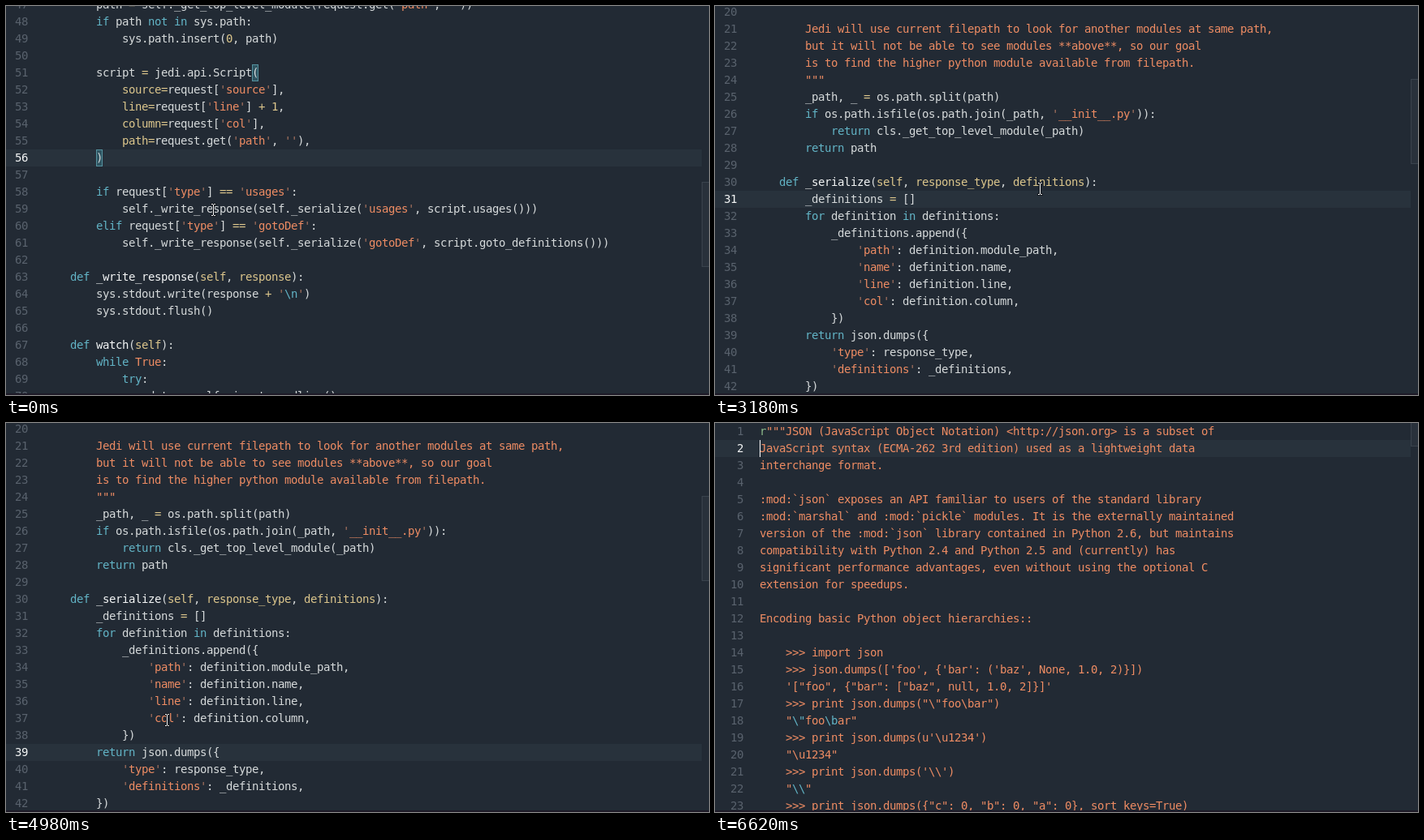
These frames come from a looping animation (866x480 px, 6690 ms). An HTML page with a canvas:

```html
<!DOCTYPE html>
<html lang="en">
<head>
<meta charset="utf-8">
<title>Go to definition</title>
<style>
html, body { margin: 0; width: 100%; height: 100%; overflow: hidden; background: #222a34; }
canvas { display: block; }
</style>
</head>
<body>
<canvas id="stage" width="866" height="480"></canvas>
<script>
const ctx = document.getElementById('stage').getContext('2d');
const LOOP = 6690, ROW = 21, CELL = 8, EDGE = 857;
const C = {
  bg: '#222a34', row: '#28323c', foot: '#1e1a27', text: '#d6dadb', bright: '#f4f6f6',
  key: '#62b4c6', str: '#ee8c63', quote: '#a9745f', tan: '#dcc68c', prefix: '#8dbb8b',
  num: '#59626d', thumb: '#29313b', rim: '#3a434d', match: '#2f5461', matchRim: '#55929f'
};

const split = s => s.slice(1).split('\n');

const request = {
  first: 47, top: -12, left: 47, thumb: [217, 105],
  lines: split(String.raw`
        path = self._get_top_level_module(request.get('path', ''))
        if path not in sys.path:
            sys.path.insert(0, path)

        script = jedi.api.Script(
            source=request['source'],
            line=request['line'] + 1,
            column=request['col'],
            path=request.get('path', ''),
        )

        if request['type'] == 'usages':
            self._write_response(self._serialize('usages', script.usages()))
        elif request['type'] == 'gotoDef':
            self._write_response(self._serialize('gotoDef', script.goto_definitions()))

    def _write_response(self, response):
        sys.stdout.write(response + '\n')
        sys.stdout.flush()

    def watch(self):
        while True:
            try:
                data = self._input.readline()`)
};

const serialize = {
  first: 20, top: -3, left: 47, thumb: [90, 105], docEnd: 24,
  lines: split(String.raw`

        Jedi will use current filepath to look for another modules at same path,
        but it will not be able to see modules **above**, so our goal
        is to find the higher python module available from filepath.
        """
        _path, _ = os.path.split(path)
        if os.path.isfile(os.path.join(_path, '__init__.py')):
            return cls._get_top_level_module(_path)
        return path

    def _serialize(self, response_type, definitions):
        _definitions = []
        for definition in definitions:
            _definitions.append({
                'path': definition.module_path,
                'name': definition.name,
                'line': definition.line,
                'col': definition.column,
            })
        return json.dumps({
            'type': response_type,
            'definitions': _definitions,
        })`)
};

const library = {
  first: 1, top: 0, left: 55, thumb: [-1, 30], docEnd: 99,
  lines: split(String.raw`
r"""JSON (JavaScript Object Notation) <http://json.org> is a subset of
JavaScript syntax (ECMA-262 3rd edition) used as a lightweight data
interchange format.

:mod:${'`json`'} exposes an API familiar to users of the standard library
:mod:${'`marshal`'} and :mod:${'`pickle`'} modules. It is the externally maintained
version of the :mod:${'`json`'} library contained in Python 2.6, but maintains
compatibility with Python 2.4 and Python 2.5 and (currently) has
significant performance advantages, even without using the optional C
extension for speedups.

Encoding basic Python object hierarchies::

    >>> import json
    >>> json.dumps(['foo', {'bar': ('baz', None, 1.0, 2)}])
    '["foo", {"bar": ["baz", null, 1.0, 2]}]'
    >>> print json.dumps("\"foo\bar")
    "\"foo\bar"
    >>> print json.dumps(u'\u1234')
    "\u1234"
    >>> print json.dumps('\\')
    "\\"
    >>> print json.dumps({"c": 0, "b": 0, "a": 0}, sort_keys=True)`)
};

// Each view starts at a time and shows a page with one active line.
const views = [
  { at: 0, page: request, line: 56, brackets: [[303, 72], [111, 177]] },
  { at: 1390, page: request, line: 59 },
  { at: 2700, page: serialize, line: 31 },
  { at: 4310, page: serialize, line: 39 },
  { at: 5100, page: library, line: 2 }
];

// Visible spans of the blinking caret: from, to, x, y.
const carets = [
  [1810, 2210, 415, 240], [2640, 2700, 415, 240],
  [2700, 3180, 111, 228], [3570, 3970, 111, 228], [4250, 4310, 111, 228],
  [4310, 4710, 183, 396],
  [5100, 5510, 55, 21], [5890, 6260, 55, 21], [6620, LOOP, 55, 21]
];

// Mouse path: time, x, y.
const path = [
  [0, 255, 251], [590, 255, 251], [710, 290, 268], [830, 366, 281], [990, 429, 265],
  [1070, 429, 265], [1190, 417, 257], [1569, 417, 257], [1570, 413, 252],
  [3140, 413, 252], [3350, 348, 112], [3530, 348, 112], [3730, 262, 230],
  [3930, 180, 358], [4210, 184, 403], [4540, 184, 403], [4860, 198, 366],
  [5640, 198, 366], [5840, 420, 436], [5960, 650, 443], [6080, 880, 430], [LOOP, 880, 430]
];

const keywords = /^(if|elif|not|in|for|def|while|try|return)$/;
const tokens = /'[^']*'|\w+(?==)|\w+|[=+]+|\s+|[^\w\s]/g;

function colorCode(line) {
  const out = [];
  const add = (s, color) => out.push([s, color]);
  const isDef = /^\s*def /.test(line);
  let inArgs = false, afterDef = false;
  for (const m of line.matchAll(tokens)) {
    const s = m[0], next = line[m.index + s.length];
    if (s[0] === "'") {
      const body = s.slice(1, -1);
      add("'", C.quote);
      add(body, body[0] === '\\' ? C.key : C.str);
      add("'", C.quote);
    } else if (keywords.test(s)) {
      add(s, C.key);
      afterDef = s === 'def';
    } else if (s === 'True') add(s, C.str);
    else if (/^(\d+|[=+]+)$/.test(s)) add(s, C.tan);
    else if (/^\w/.test(s)) {
      const param = next === '=' || isDef && inArgs;
      add(s, param ? C.tan : afterDef ? C.bright : C.text);
      afterDef = false;
    } else {
      if (s === '(') inArgs = true;
      add(s, C.text);
    }
  }
  return out;
}

function colorDoc(line) {
  if (line.startsWith('r"""')) return [['r', C.prefix], [line.slice(1), C.str]];
  if (!/^ +"\\[^u]/.test(line)) return [[line, C.str]];
  return line.split(/(\\.)/).map(s => [s, s[0] === '\\' ? C.key : C.str]);
}

for (const page of [request, serialize, library]) {
  page.runs = page.lines.map((line, i) =>
    page.first + i <= (page.docEnd || 0) ? colorDoc(line) : colorCode(line));
}

function rect(x, y, w, h, color) {
  ctx.fillStyle = color;
  ctx.fillRect(x, y, w, h);
}

function framed(x, y, w, h, fill, rim) {
  rect(x, y, w, h, rim);
  rect(x + 1, y + 1, w - 2, h - 2, fill);
}

// Writes on the character grid and returns the next free x.
function write(s, x, y, color) {
  ctx.fillStyle = color;
  for (const ch of s) {
    if (ch !== ' ') ctx.fillText(ch, x, y);
    x += CELL;
  }
  return x;
}

function drawPage({ page, line, brackets = [] }) {
  rect(0, page.top + (line - page.first) * ROW, EDGE, ROW, C.row);
  for (const [x, y] of brackets) framed(x, y, CELL, ROW, C.match, C.matchRim);
  page.runs.forEach((runs, i) => {
    const n = page.first + i, label = String(n);
    const y = page.top + i * ROW + 15;
    write(label, page.left - 20 - label.length * CELL, y, n === line ? C.bright : C.num);
    let x = page.left;
    for (const [s, color] of runs) x = write(s, x, y, color);
  });
  framed(EDGE, page.thumb[0], 12, page.thumb[1], C.thumb, C.rim);
}

function drawPointer(x, y) {
  const beam = [[-2, -7, 2, 1], [1, -7, 2, 1], [0, -6, 1, 13], [-2, 7, 2, 1], [1, 7, 2, 1]];
  for (const [a, b, w, h] of beam) rect(x + a - 1, y + b - 1, w + 2, h + 2, '#151a20');
  for (const [a, b, w, h] of beam) rect(x + a, y + b, w, h, '#fff');
}

function pointerAt(t) {
  const i = path.findIndex(p => p[0] > t);
  const [t0, x0, y0] = path[i - 1], [t1, x1, y1] = path[i];
  const k = (t - t0) / (t1 - t0);
  return [Math.round(x0 + (x1 - x0) * k), Math.round(y0 + (y1 - y0) * k)];
}

function draw(t) {
  rect(0, 0, 866, 480, C.bg);
  ctx.font = '14px "DejaVu Sans Mono", monospace';
  drawPage(views.findLast(v => v.at <= t));
  for (const [from, to, x, y] of carets) {
    if (t >= from && t < to) rect(x, y, 1, ROW, '#fff');
  }
  rect(0, 478, 866, 2, C.foot);
  drawPointer(...pointerAt(t));
}

const start = performance.now();
function tick() {
  draw((performance.now() - start) % LOOP);
  requestAnimationFrame(tick);
}
tick();
</script>
</body>
</html>
```
